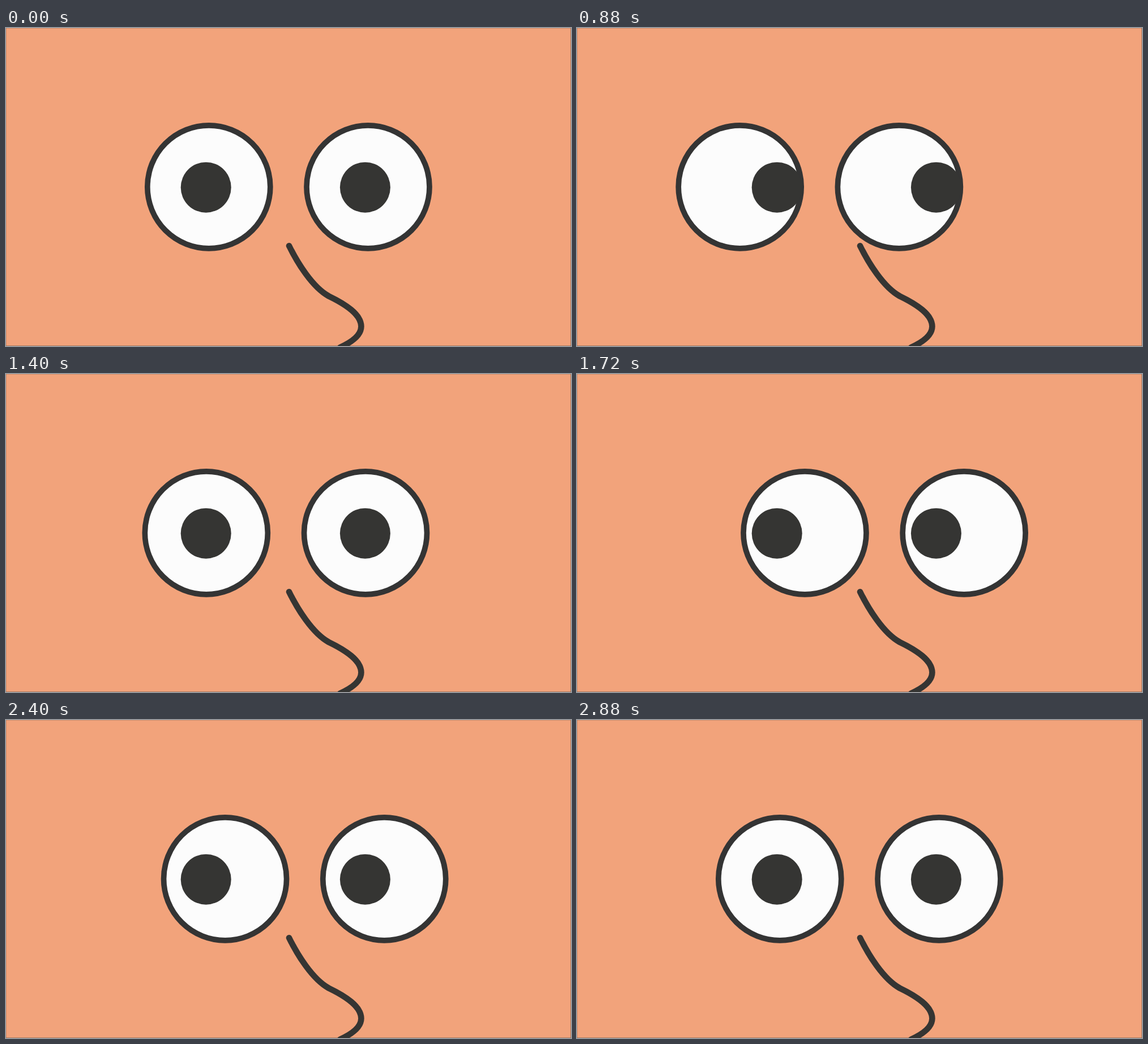
These frames come from a looping animation (998 by 561 pixels, 4.08 s). An HTML page:

```html
<!DOCTYPE html>
<html lang="en">
<head>
<meta charset="utf-8">
<title>Shifting eyes</title>
<style>
  html, body { margin: 0; width: 100%; height: 100%; overflow: hidden; background: #f2a37b; }
  svg { display: block; width: 100%; height: 100%; }
  .eye { fill: #fcfcfc; stroke: #343434; stroke-width: 9.7; }
  .pupil { fill: #353533; }
  .nose { fill: none; stroke: #353533; stroke-width: 10.6; stroke-linecap: round; stroke-linejoin: round; }
  .edge { fill: none; stroke: #8a6a58; stroke-width: 1; }
</style>
</head>
<body>
<svg viewBox="0 0 998 561">
  <rect width="998" height="561" fill="#f2a37b"/>
  <path class="edge" opacity=".35" d="M0 .5H998M.5 0V561"/>
  <path class="edge" opacity=".7" d="M997.5 0V561M0 560.5H998"/>
  <g id="eyes">
    <circle class="eye" cx="358.3" cy="280.3" r="108.5"/>
    <circle class="eye" cx="639.5" cy="280.3" r="108.5"/>
  </g>
  <circle class="pupil" cx="353.2" cy="281.2" r="44.5"/>
  <circle class="pupil" cx="634.4" cy="281.2" r="44.5"/>
  <path class="nose" d="M500 384.2C514 413 541 457 570 473C599 487 627.4 505 627.4 526.5C627.4 542 611 554 590 563.5"/>
</svg>
<script>
  const LOOP = 4080, STEP = 40;
  const eyes = document.getElementById('eyes');

  // start, end, from, to, ease handles
  const moves = [
    [0, 840, 0, -71.2, 0.364, 0.636],
    [840, 1915, -71.2, 56.6, 0.313, 0.702],
    [1925, 2885, 56.6, 0, 0.364, 0.636]
  ];

  // cubic-bezier(a, 0, b, 1), solved by bisection
  function ease(p, a, b) {
    let lo = 0, hi = 1, u = p;
    for (let i = 0; i < 24; i++) {
      u = (lo + hi) / 2;
      const v = 1 - u;
      const x = 3 * a * u * v * v + 3 * b * u * u * v + u * u * u;
      if (x < p) lo = u; else hi = u;
    }
    return u * u * (3 - 2 * u);
  }

  function offset(t) {
    let x = 0;
    for (const [start, end, from, to, a, b] of moves) {
      if (t < start) break;
      const p = Math.min(1, (t - start) / (end - start));
      x = from + (to - from) * ease(p, a, b);
    }
    return x;
  }

  function draw(now) {
    const t = Math.floor((now % LOOP) / STEP) * STEP;
    eyes.setAttribute('transform', `translate(${offset(t).toFixed(2)} 0)`);
  }

  const begin = performance.now();
  function tick() {
    draw(performance.now() - begin);
    requestAnimationFrame(tick);
  }
  tick();
</script>
</body>
</html>
```
